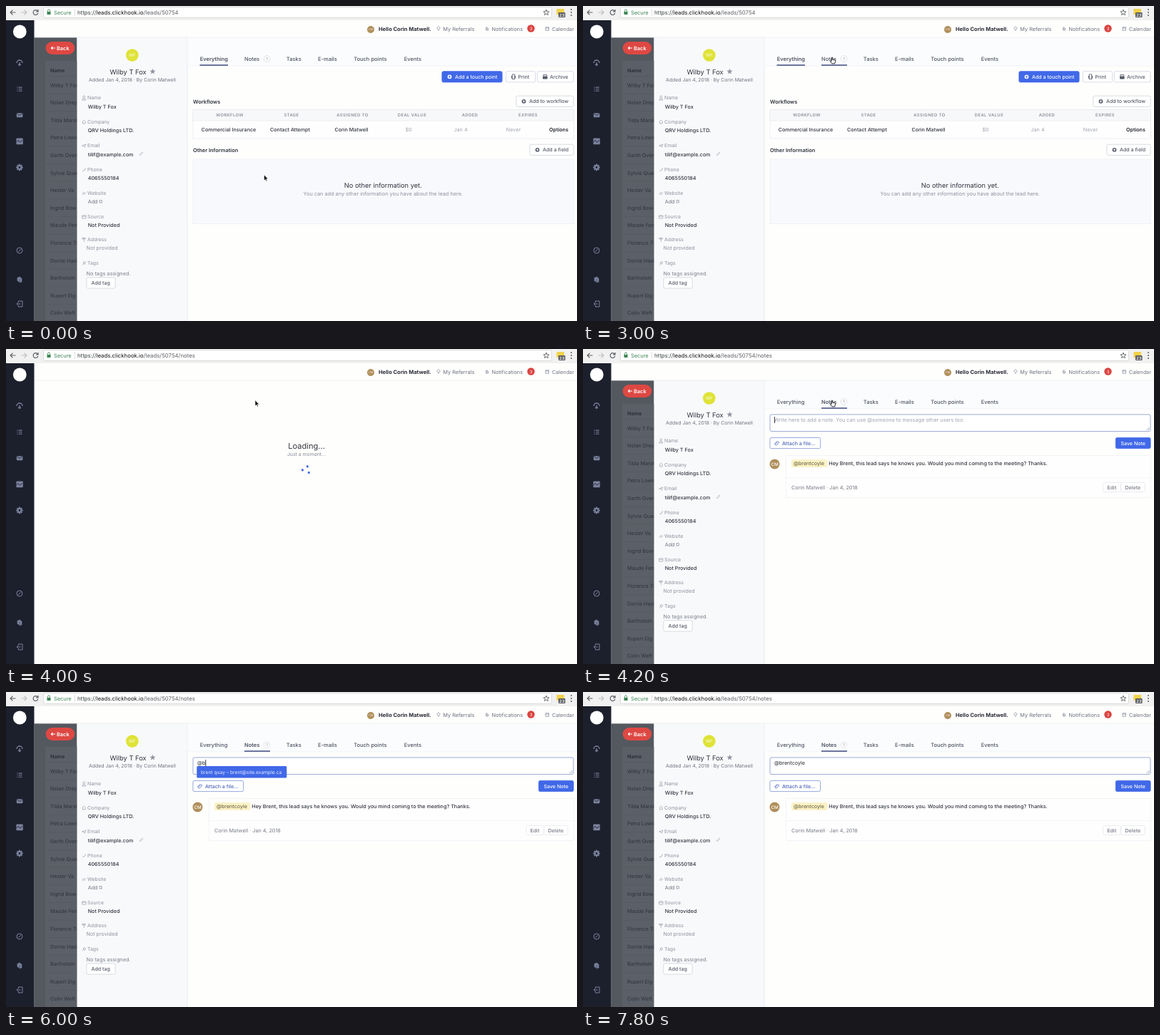
An HTML page for the animation above (8 s loop, 800x442 px).

```html
<!DOCTYPE html>
<html lang="en">
<head>
<meta charset="utf-8">
<title>Lead notes</title>
<style>
  html, body { margin: 0; width: 100%; height: 100%; overflow: hidden; background: #fefefd; }
  svg { display: block; width: 100vw; height: 100vh; }
  text { font-family: Inter, "Open Sans", sans-serif; text-rendering: geometricPrecision; white-space: pre; }
</style>
</head>
<body>
<svg id="stage" viewBox="0 0 800 442"></svg>
<script>
const LOOP = 8000, STEP = 200;
const BLUE = '#4068e8', INK = '#30343e', GREY = '#8d929e', LINE = '#cfd3db', PALE = '#f8f9fc', TAN = '#b08f5c';
const USER = 'Corin Matwell', LEAD = 'Wilby T Fox';
const $ = id => document.getElementById(id);

// Markup helpers; y of text is its vertical middle.
const text = (x, y, s, size = 7.2, fill = INK, weight = 400, more = '') =>
  `<text x="${x}" y="${y + size * 0.36}" font-size="${size}" fill="${fill}" font-weight="${weight}" ${more}>${s}</text>`;
const mid = (x, y, s, size, fill, weight, more = '') =>
  text(x, y, s, size, fill, weight, 'text-anchor="middle" ' + more);
const rect = (x, y, w, h, fill, stroke = 'none', r = 0) =>
  `<rect x="${x}" y="${y}" width="${w}" height="${h}" rx="${r}" fill="${fill}" stroke="${stroke}" stroke-width=".8"/>`;
const circle = (x, y, r, fill, stroke = 'none', w = 1) =>
  `<circle cx="${x}" cy="${y}" r="${r}" fill="${fill}" stroke="${stroke}" stroke-width="${w}"/>`;
const path = (d, stroke, w = 1, fill = 'none', x = 0, y = 0) =>
  `<path transform="translate(${x} ${y})" d="${d}" stroke="${stroke}" stroke-width="${w}" fill="${fill}"/>`;
const group = (id, s) => `<g id="${id}">${s}</g>`;
const button = (x, y, w, s, tx, fill = '#fff', ink = '#555b68', edge = LINE, h = 16) =>
  rect(x + .4, y + .4, w - .8, h - .8, fill, edge, 2) + text(tx, y + h / 2, s, 7.05, ink, 500);
const plus = (x, y, disc, cross) =>
  circle(x, y, 2.9, disc) + path('M-1.6 0H1.6M0-1.6V1.6', cross, .9, 'none', x, y);
const star = (x, y, r, fill, stroke = 'none') => {
  const pts = Array.from({ length: 10 }, (_, i) => {
    const a = i * Math.PI / 5, q = i % 2 ? r * .42 : r;
    return (x + q * Math.sin(a)).toFixed(2) + ',' + (y - q * Math.cos(a)).toFixed(2);
  });
  return `<polygon points="${pts.join(' ')}" fill="${fill}" stroke="${stroke}" stroke-width=".9"/>`;
};

function browserBar() {
  const dark = '#5c5f63';
  return rect(0, 0, 800, 20, '#f1f1f1') + rect(52.5, 1.5, 712, 15, '#fff', '#d4d4d4', 2) +
    path('M4 0H-3.2M0-3.4L-3.4 0 0 3.4', dark, 1.2, 'none', 9.5, 9) +
    path('M-4 0H3.2M0-3.4L3.4 0 0 3.4', '#bcbec1', 1.2, 'none', 25.5, 9) +
    path('M3-1.6A3.4 3.4 0 1 0 3.3 1M3.5-4V-1.2H.7', dark, 1.2, 'none', 41.5, 9) +
    rect(57.5, 8, 5, 4, '#3d8553') + path('M-1.5 0V-1.5A1.5 1.5 0 0 1 1.5-1.5V0', '#3d8553', .9, 'none', 60, 8) +
    text(67, 9, 'Secure', 7.4, '#3d8553') + path('M96.5 4V14', '#d8d8d8', .8) +
    text(100, 9, 'https://<tspan fill="#101214">leads.clickhook.io</tspan><tspan fill="#5f6267">/leads/50754</tspan><tspan id="tail" fill="#5f6267">/notes</tspan>', 7.82, '#34423b') +
    star(757, 9.2, 4.2, 'none', dark) +
    rect(771.5, 4, 10.5, 8, '#f2d24a') + rect(774, 9, 9.5, 7, '#55575b', 'none', 1) + mid(778.7, 12.5, '23', 6, '#fff', 600) +
    [5, 9, 13].map(y => circle(792, y, 1, dark)).join('');
}

function sideBar() {
  const c = '#7a829c';
  const gear = Array.from({ length: 8 }, (_, i) =>
    `<rect x="-1" y="-4.8" width="2" height="3" fill="${c}" transform="translate(19 226.5) rotate(${i * 45})"/>`).join('');
  return rect(0, 20, 39.5, 422, '#1c202d') + circle(19.3, 36, 9.4, '#fff') +
    path('M-4 0A4 4 0 0 1 4 0M0-1V3.6M0 3.6L-1.8 1.8M0 3.6L1.8 1.8', c, 1.4, 'none', 19, 80) +
    path('M-3.5-2.6h1.2M-3.5 0h1.2M-3.5 2.6h1.2M-1.2-2.6H3.6M-1.2 0H3.6M-1.2 2.6H3.6', c, 1.1, 'none', 19, 116.7) +
    rect(14.8, 150.2, 8.6, 6, c, 'none', 1) + path('M-4-2.4L0 .6 4-2.4', '#1c202d', .8, 'none', 19, 153) +
    rect(14.4, 185.6, 9.4, 8.6, c, 'none', 1) + path('M-4 .6L-1.6-1.4 .6 1.2 4-1.8', '#1c202d', .9, 'none', 19, 190) +
    gear + circle(19, 226.5, 2.4, 'none', c, 2) +
    circle(19, 343, 4, 'none', c) + path('M1.9-1.9L-.5 .5M-1.8 1.6L.6-.4', c, 1, 'none', 19, 343) +
    path('M-3.6-2.8L.2-4.4 3.6-1.8V3.2L.4 4.4-3.6 1.4ZM.2-1.4V4', '#1c202d', .5, c, 19, 384) +
    path('M-1.6-2V-4H4V4H-1.6V2M1.6 0H-4M-2.2-1.8L-4 0-2.2 1.8', c, 1, 'none', 19, 418);
}

function header() {
  const c = '#6d727f';
  return rect(39.5, 20, 761, 24, '#fefefd') + path('M39.5 44H800', '#e9ebef', .8) +
    circle(511, 33, 5, TAN) + mid(511, 33, 'CM', 4, '#f2e8d8') +
    text(522, 32, `Hello ${USER}.`, 7.5, '#2a2d36', 700) +
    path('M0 2.4L-1.8-.4A1.9 1.9 0 1 1 1.8-.4Z', GREY, .8, 'none', 606, 32) + text(612.3, 32, 'My Referrals', 7.35, c) +
    path('M-1.4 2V-2H.4L1.6-.8V2ZM-.8-.4H.8M-.8 1H.8', GREY, .8, 'none', 674, 32) + text(680.5, 32, 'Notifications', 7.3, c) +
    circle(735.5, 31.5, 5.2, '#d9443f') + mid(735.5, 31.5, '3', 6, '#fff') +
    rect(756, 29.8, 4.6, 4.4, 'none', GREY) + path('M756 31H760.6', GREY, .8) + text(765, 32, 'Calendar', 7.25, c);
}

function backdrop() {
  const people = [LEAD, 'Nolan Drey', 'Tilda Marsk', 'Petra Lowick', 'Garth Ovens', 'Sylvie Quarn', 'Hester Va',
    'Ingrid Bow', 'Maude Fenn', 'Florence Ti', 'Dorrie Hask', 'Bartholom', 'Rupert Elg', 'Colin Weft'];
  return rect(39.5, 44, 60, 398, '#54585f') + rect(55, 77, 45, 365, '#5b5f67') +
    text(62, 90.5, 'Name', 7.2, '#292d36', 600) +
    people.map((s, i) => path(`M55 ${98.7 + i * 24.6}H100`, '#555961', .7) + text(62, 111 + i * 24.6, s, 7.2, '#2f333c')).join('') +
    rect(55.6, 50, 40.6, 18, '#de4843', 'none', 9) +
    path('M3 0H-2.6M-.6-2L-2.6 0-.6 2', '#fff', 1.1, 'none', 66, 59) + text(71, 59, 'Back', 7.4, '#fff', 600);
}

function profile() {
  const icons = {
    Name: 'M-1.5-1.5a1.5 1.5 0 1 1 3 0a1.5 1.5 0 1 1-3 0M-2.5 3A2.5 2.2 0 0 1 2.5 3Z',
    Company: 'M-2.6 0L0-2.4 2.6 0M-1.8 0V2.4H1.8V0', Email: 'M-2.8 0L2.6-2 1 2.2-.2.4Z',
    Phone: 'M-2.2 2.2Q2 2 2.2-2.2', Website: 'M-2 2L2-2M-2.4.4L-.4-1.6M.4 1.6L2.4-.4',
    Source: 'M-2.6-2H2.6V2H-2.6ZM-2.6-1H2.6', Address: 'M0 2.8V-2.4M-2.4-1H1.6L2.6-2 1.6-2.6H-2.4Z', Tags: 'M-2.4 2.4L0 0M-1.4-1L1 1.4 2.4-1.4 1-2.4Z'
  };
  const label = (s, y) => path(icons[s], '#a2a6b0', .8, 'none', 109.3, y) + text(114, y, s, 6.9, GREY);
  const field = (s, y, value, vy) => label(s, y) + text(114.7, vy, value, 7.2, INK, 500);
  return rect(99.5, 44, 155, 398, '#f8f9fb') + path('M254 44V442', '#e6e8ee', .8) +
    circle(176.8, 69, 8.8, '#dfe336') + mid(176.8, 69, 'WF', 6, '#f6f7c4', 600) +
    mid(171, 92.5, LEAD, 9.3, '#2f333c') + star(205.5, 92, 4.3, '#8f949e') +
    mid(177, 103.5, `Added Jan 4, 2018 · By ${USER}`, 6.9, '#6f747f') +
    field('Name', 129, LEAD, 141) + field('Company', 162.5, 'QRV Holdings LTD.', 174) +
    field('Email', 196, 'tilif@example.com', 208) + path('M-2.2 2.2L-1.8.8 1.4-2.4 2.4-1.4-.8 1.8Z', '#b0b4bd', .7, 'none', 189.5, 207.3) +
    field('Phone', 229.5, '4065550184', 241) +
    label('Website', 263) + text(114.7, 274, 'Add', 7.2, '#6f747f') + rect(131, 272.7, 3.2, 3.2, 'none', GREY) +
    field('Source', 296, 'Not Provided', 307) +
    label('Address', 328) + text(112.5, 339, 'Not provided', 7.2, GREY) +
    label('Tags', 361) + text(112.5, 375, 'No tags assigned.', 7.3, '#7a7f8a') + button(112.5, 380.5, 41, 'Add tag', 119.5);
}

function tabs() {
  const list = [[334, 'Notes'], [392.8, 'Tasks'], [437, 'E-mails'], [487.2, 'Touch points'], [557.8, 'Events']];
  const bar = (id, x, w) => `<rect id="${id}" x="${x}" y="82.2" width="${w}" height="1.6" fill="#4a5688"/>`;
  return rect(254.4, 44.4, 546, 39.6, '#fbfcfd') + path('M254 84H800', '#eef0f4', .8) +
    text(271.7, 74, 'Everything', 7.5, '#4d5362', 500, 'id="tabAll"') +
    list.map(([x, s]) => text(x, 74, s, 7.5, '#4d5362', 500, s === 'Notes' ? 'id="tabNotes"' : '')).join('') +
    circle(365.5, 74, 4.3, '#fff', '#d3d6dd', .7) + mid(365.5, 74, '1', 5.4, '#777c88') +
    bar('barAll', 271.5, 39.5) + bar('barNotes', 334, 36);
}

function everything() {
  const heads = [[313.5, 'WORKFLOW'], [400, 'STAGE'], [485.5, 'ASSIGNED TO'], [569, 'DEAL VALUE'], [650, 'ADDED'], [731.5, 'EXPIRES']];
  const cells = [[312, 'Commercial Insurance'], [398, 'Contact Attempt'], [484, USER], [564, '$0'], [637, 'Jan 4'], [711, 'Never']];
  const dark = '#555b68';
  return button(610.5, 91.3, 85, 'Add a touch point', 629, BLUE, '#fff', BLUE) + plus(621.5, 99.3, '#fff', BLUE) +
    button(700, 91.3, 42, 'Print', 717.5) + rect(708, 98, 6, 3.4, dark) + rect(709.2, 96, 3.6, 6.6, '#fff', dark) +
    button(744, 91.3, 51.5, 'Archive', 762) + rect(752, 98.5, 6.6, 4, dark, 'none', .8) + path('M-2.4 0V-2H2.4V0', dark, .9, 'none', 755.3, 98.6) +
    text(262, 134, 'Workflows', 7.4, INK, 600) + button(714.5, 125.8, 81, 'Add to workflow', 733) + plus(725.5, 133.8, dark, '#fff') +
    rect(262, 145.5, 533.5, 40.5, '#fefefe', '#e8eaef') + rect(262, 145.5, 533.5, 15.5, '#f7f8fa', '#e8eaef') +
    heads.map(([x, s]) => mid(x, 153, s, 5.9, '#7d828e', 500, 'letter-spacing=".42"')).join('') +
    cells.map(([x, s], i) => i < 3 ? mid(x, 173.5, s, 7.15, INK, 500) : mid(x, 173.5, s, 7.2, '#a0a5af')).join('') +
    text(761, 173.5, 'Options', 7.1, '#22252d', 600) +
    text(262, 202, 'Other Information', 7.4, INK, 600) + button(733.5, 193.8, 62, 'Add a field', 752) + plus(744.5, 201.8, dark, '#fff') +
    rect(262, 215, 533.5, 90.5, PALE, '#edeff4') +
    mid(528.3, 252, 'No other information yet.', 9.25, '#2f333c') +
    mid(528.3, 263, 'You can add any other information you have about the lead here.', 7.32, GREY);
}

function notes() {
  return rect(262, 91.9, 533, 23.6, '#fff', '#8496cc', 2) + path('M0 4L4 0M2 4L4 2', '#8c919c', .7, 'none', 789.5, 110) +
    text(268, 99.3, 'Write here to add a note. You can use @someone to message other users too.', 7.24, '#9ca1ab', 400, 'id="hint"') +
    text(268, 99.3, '', 7.2, '#23262e', 400, 'id="typed"') +
    '<rect id="caret" y="95" width=".9" height="9" fill="#23262e"/>' +
    button(261.5, 124, 71.5, 'Attach a file...', 279, '#fff', '#4a64b8', '#7d93d6') +
    path('M-2 1.4L1-1.8A1.2 1.2 0 0 1 2.6 0L-.4 2.8A1.8 1.8 0 0 1-2.6.4L.4-2.4', '#4a64b8', .8, 'none', 271.5, 132) +
    button(746, 124, 49.5, 'Save Note', 753.5, BLUE, '#fff', BLUE) +
    circle(268.5, 161.5, 7, TAN) + mid(268.5, 161.5, 'CM', 6.2, '#fff', 500) +
    rect(284.5, 149.5, 511, 59, '#fefefe', '#f1f2f5') + path('M285 180.5H795', '#f3f4f7', .7) +
    rect(292, 155, 50.5, 11, '#fcf2c6', 'none', 2) + text(295, 160.5, '@brentcoyle', 7.2, '#5c5738') +
    text(344.3, 160.5, 'Hey Brent, this lead says he knows you. Would you mind coming to the meeting? Thanks.', 7.22, INK, 500) +
    text(292, 194.5, `${USER} · Jan 4, 2018`, 7.25, '#757a85') +
    button(728.5, 187, 25, 'Edit', 734.5, '#fff', '#737884', '#e6e8ec', 14) + button(753.5, 187, 34, 'Delete', 759.5, '#fff', '#737884', '#e6e8ec', 14) +
    group('menu', rect(267.3, 104, 126, 16.5, BLUE, 'none', 1.5) + text(273, 112.2, 'brent quay – brent@site.example.ca', 6.7, '#eaf0ff'));
}

function loading() {
  const dots = [[2, -5.5], [-4.6, .5], [3.2, 4]];
  return rect(39.5, 44.5, 761, 398, '#fefefd') + mid(421, 136.3, 'Loading...', 11.1, '#34373f') +
    mid(421, 147.3, 'Just a moment...', 6.9, '#858a95') +
    group('spin', dots.map(([x, y]) => circle(420.5 + x, 169 + y, 1.6, BLUE)).join(''));
}

const pointers =
  group('arrow', path('M0 0V8.2L1.9 6.5 3.2 9.3 4.5 8.7 3.2 6H5.7Z', '#fff', .6, '#111')) +
  group('hand', path('M-.8 5.5V.6Q0-.5.8.6V3.4L4 4.2Q4.8 4.5 4.6 5.6L3.8 9H-.2L-2.6 5.8Q-2.4 4.6-.8 5.5Z', '#111', .9, '#fff'));

$('stage').innerHTML = rect(0, 0, 800, 442, '#fefefd') +
  group('view', backdrop() + profile() + tabs() + group('all', everything()) + group('notes', notes())) +
  group('wait', loading()) + header() + sideBar() + browserBar() + group('pointer', pointers);

const show = (id, on) => $(id).setAttribute('display', on ? 'inline' : 'none');
const ease = p => p * p * (3 - 2 * p);
const ramp = (t, a, b) => ease(Math.min(1, Math.max(0, (t - a) / (b - a))));

const LOAD = 3600, READY = 4200;
const KEYS = [[READY, ''], [5400, '@'], [5800, '@b'], [7000, '@brentcoyle ']];

function draw(ms) {
  const t = Math.floor(ms % LOOP / STEP) * STEP;
  const onNotes = t >= READY, waiting = t >= LOAD && !onNotes, hover = t >= 2600 && !waiting;

  show('tail', t >= LOAD);
  show('wait', waiting);
  show('view', !waiting);
  show('all', !onNotes);
  show('notes', onNotes);
  show('barAll', !onNotes);
  show('barNotes', hover);
  $('tabAll').setAttribute('font-weight', onNotes ? 500 : 600);
  $('tabNotes').setAttribute('font-weight', onNotes ? 600 : 500);
  $('spin').setAttribute('transform', `rotate(${t >= 4000 ? 120 : 0} 420.5 169)`);

  const [since, typed] = KEYS.filter(k => k[0] <= t).pop() || KEYS[0];
  $('typed').textContent = typed;
  show('hint', !typed);
  show('menu', typed === '@b');
  show('caret', onNotes && (t - since) % 1200 < 600);
  if (onNotes) $('caret').setAttribute('x', 268 + (typed ? $('typed').getComputedTextLength() : 0));

  const a = ramp(t, 200, 1400), b = ramp(t, 1600, 2800);
  const x = 361.5 + 28 * a - 40.5 * b, y = 236.8 - 37 * a - 128 * b;
  show('pointer', t < 5400);
  show('hand', hover);
  show('arrow', !hover);
  $('pointer').setAttribute('transform', `translate(${x} ${y})`);
}

const start = performance.now();
function tick() {
  draw(performance.now() - start);
  requestAnimationFrame(tick);
}
tick();
</script>
</body>
</html>
```
